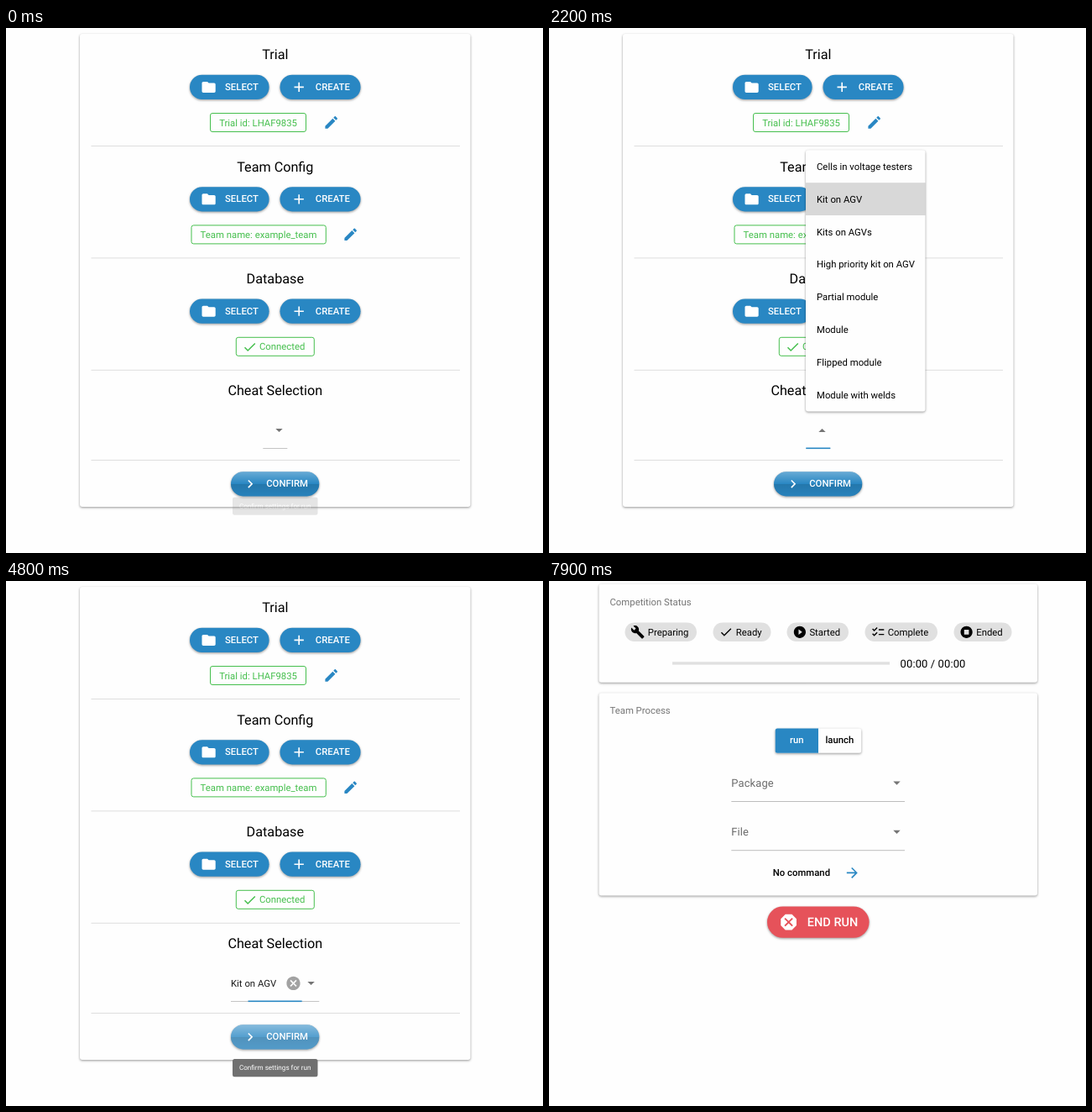
An HTML page for the animation above (8 s loop, 640x625 px).

```html
<!DOCTYPE html>
<html lang="en">
<head>
<meta charset="utf-8">
<title>Trial setup</title>
<style>
  html, body { margin: 0; width: 100%; height: 100%; overflow: hidden; background: #fefefe; }
  svg { display: block; }
  text { font: 11.34px Roboto, sans-serif; text-rendering: geometricPrecision; }
  .title { font-size: 16.2px; }
  .btn { font-weight: 500; }
  .big { font-size: 14.5px; font-weight: 500; }
  .field { font-size: 12.96px; letter-spacing: .12px; }
  .tip { font-size: 8.1px; }
  .raised { filter: drop-shadow(0 1px 1.6px rgba(0,0,0,.22)) drop-shadow(0 1px .8px rgba(0,0,0,.2)); }
  .pivot { transform-box: fill-box; transform-origin: center; }
</style>
</head>
<body>
<svg id="stage" width="640" height="625" viewBox="0 0 640 625">
  <defs>
    <linearGradient id="gloss" x1="0" y1="0" x2="0" y2="1">
      <stop offset="0" stop-color="#fff" stop-opacity=".3"/>
      <stop offset=".5" stop-color="#fff" stop-opacity="0"/>
      <stop offset=".51" stop-color="#000" stop-opacity=".12"/>
      <stop offset="1" stop-color="#000" stop-opacity=".04"/>
    </linearGradient>
  </defs>
</svg>
<script>
const LOOP = 8000;
const BLUE = '#2987c3', GREEN = '#45bf4d', RED = '#e6525a', GREY = '#757575';
const STD = 'cubic-bezier(.4,0,.2,1)', SOFT = 'cubic-bezier(.25,.8,.5,1)';
const DISC = 'M12 2C6.48 2 2 6.48 2 12s4.48 10 10 10 10-4.48 10-10S17.52 2 12 2z';
const ICONS = {
  folder: 'M10 4H4c-1.1 0-2 .9-2 2v12c0 1.1.9 2 2 2h16c1.1 0 2-.9 2-2V8c0-1.1-.9-2-2-2h-8z',
  add: 'M19 13h-6v6h-2v-6H5v-2h6V5h2v6h6z',
  edit: 'M3 17.25V21h3.75L17.81 9.94l-3.75-3.75zM20.71 7.04c.39-.39.39-1.02 0-1.41l-2.34-2.34c-.39-.39-1.02-.39-1.41 0l-1.83 1.83 3.75 3.75z',
  check: 'M9 16.17L4.83 12l-1.42 1.41L9 19 21 7l-1.41-1.41z',
  chevron: 'M10 6L8.59 7.41 13.17 12l-4.58 4.59L10 18l6-6z',
  clear: DISC + 'm5 13.59L15.59 17 12 13.41 8.41 17 7 15.59 10.59 12 7 8.41 8.41 7 12 10.59 15.59 7 17 8.41 13.41 12z',
  build: 'M22.7 19l-9.1-9.1c.9-2.3.4-5-1.5-6.9-2-2-5-2.4-7.4-1.3L9 6 6 9 1.6 4.7C.4 7.1.9 10.1 2.9 12.1c1.9 1.9 4.6 2.4 6.9 1.5l9.1 9.1c.4.4 1 .4 1.4 0l2.3-2.3c.5-.4.5-1.1.1-1.4z',
  play: DISC + 'm-2 14.5v-9l6 4.5z',
  stop: DISC + 'm4 14H8V8h8z',
  list: 'M22 7h-9v2h9zm0 8h-9v2h9zM5.54 11L2 7.46l1.41-1.41 2.12 2.12 4.24-4.24 1.41 1.41zm0 8L2 15.46l1.41-1.41 2.12 2.12 4.24-4.24 1.41 1.41z',
  arrow: 'M12 4l-1.41 1.41L16.17 11H4v2h12.17l-5.58 5.59L12 20l8-8z',
  danger: 'M15.73 3H8.27L3 8.27v7.46L8.27 21h7.46L21 15.73V8.27zM17 15.74L15.74 17 12 13.26 8.26 17 7 15.74 10.74 12 7 8.26 8.26 7 12 10.74 15.74 7 17 8.26 13.26 12z'
};

function node(parent, tag, attrs = {}) {
  const el = document.createElementNS('http://www.w3.org/2000/svg', tag);
  for (const k in attrs) el.setAttribute(k, attrs[k]);
  parent.append(el);
  return el;
}
const group = parent => node(parent, 'g');
const rect = (p, x, y, x2, y2, fill, more) =>
  node(p, 'rect', { x, y, width: x2 - x, height: y2 - y, fill, ...more });
function label(p, x, y, str, cls = '', fill = '#000', anchor = 'start') {
  node(p, 'text', { x, y, class: cls, fill, 'text-anchor': anchor }).textContent = str;
}
const icon = (p, name, cx, cy, fill, k = .81) =>
  node(p, 'path', { d: ICONS[name], fill, 'fill-rule': 'evenodd',
    transform: `translate(${cx - 12 * k} ${cy - 12 * k}) scale(${k})` });
const card = (p, x, y, x2, y2) => rect(p, x, y, x2, y2, '#fefefe', { rx: 3, class: 'raised' });
const caret = (p, x, y) =>
  node(p, 'path', { d: `M${x - 4.2} ${y - 2}h8.4l-4.2 4.2z`, fill: GREY, class: 'pivot' });

function pill(p, x, x2, y, h, fill, name, iconX, textX, str, cls = 'btn', k = .81) {
  rect(p, x, y, x2, y + h, fill, { rx: h / 2, class: 'raised' });
  const top = group(p), mid = y + h / 2;
  icon(p, name, iconX, mid, '#fff', k);
  label(p, textX, mid + (cls === 'big' ? 5 : 3.6), str, cls, '#fff');
  return top;
}

// steps: [ms, value, easing to the next step]; equal times make a hard change
function play(el, prop, steps) {
  const last = steps[steps.length - 1];
  const all = [[0, steps[0][1]], ...steps, [LOOP, last[1]]];
  el.animate(all.map(([ms, v, easing = 'linear']) => ({ offset: ms / LOOP, [prop]: v, easing })),
    { duration: LOOP, iterations: Infinity });
}
const show = (el, from, to = LOOP) => play(el, 'opacity',
  [[from, from ? 0 : 1], [from, 1], [to, 1], [to, to < LOOP ? 0 : 1]]);

const OPEN = 50, CLOSE = 3030, PICK = 3000, BLUR = 4690, SWAP = 4900, RUN = 7700;
const stage = document.getElementById('stage');

// Setup page
const setup = group(stage);
card(setup, 88, 7, 553.5, 570);
['Trial', 'Team Config', 'Database', 'Cheat Selection'].forEach((name, i) => {
  const y = i * 133.4;
  label(setup, 320.8, y + 37.2, name, 'title', '#000', 'middle');
  if (i > 2) return;
  pill(setup, 219, 313.6, y + 55.8, 29.2, BLUE, 'folder', 241.6, 261, 'SELECT');
  pill(setup, 326.5, 422.6, y + 55.8, 29.2, BLUE, 'add', 349.2, 368.8, 'CREATE');
  rect(setup, 101.5, y + 140, 541, y + 141, '#dedede');
});
rect(setup, 101.5, 514, 541, 515, '#dedede');

function tag(x, x2, y, textX, str) {
  rect(setup, x, y, x2, y + 22, 'none', { rx: 2.5, stroke: GREEN });
  label(setup, textX, y + 15, str, '', GREEN);
}
tag(243.5, 357.5, 101.5, 254.2, 'Trial id: LHAF9835');
tag(221, 381.3, 234.9, 231.6, 'Team name: example_team');
tag(274.3, 367.3, 368.3, 302, 'Connected');
icon(setup, 'edit', 387.7, 112.4, BLUE);
icon(setup, 'edit', 410.7, 245.8, BLUE);
icon(setup, 'check', 290.5, 379.8, GREEN, .76);

function select(x, x2, caretX) {
  const g = group(setup);
  rect(g, x, 500, x2, 501, '#c4c4c4');
  const line = rect(g, x, 499.5, x2, 501.1, BLUE, { class: 'pivot' });
  const arrow = caret(g, caretX, 478.9);
  play(line, 'transform', [[OPEN, 'scaleX(0)', STD], [OPEN + 360, 'scaleX(1)'],
    [BLUR, 'scaleX(1)', STD], [BLUR + 360, 'scaleX(0)']]);
  play(arrow, 'transform', [[OPEN, 'rotate(0deg)', STD], [OPEN + 360, 'rotate(180deg)'],
    [CLOSE, 'rotate(180deg)', STD], [CLOSE + 360, 'rotate(0deg)']]);
  return g;
}
show(select(306.3, 335.3, 325.5), 0, PICK);
const filled = select(268, 373.3, 363.6);
label(filled, 268, 482.6, 'Kit on AGV', '', '#1c1c1c');
icon(filled, 'clear', 342.5, 478.9, '#a2a2a2');
show(filled, PICK);

const confirmTop = pill(setup, 268, 373.3, 528.2, 29.2, BLUE, 'chevron', 291, 310.2, 'CONFIRM');
rect(confirmTop, 268, 528.2, 373.3, 557.4, 'url(#gloss)', { rx: 14.6 });
const press = rect(confirmTop, 268, 528.2, 373.3, 557.4, '#fff', { rx: 14.6 });
play(press, 'opacity', [[BLUR, 0], [4790, .2]]);

const tip = group(setup);
rect(tip, 270, 569, 371.5, 590.3, '#707070', { rx: 2.5 });
label(tip, 320.7, 582.3, 'Confirm settings for run', 'tip', '#fff', 'middle');
play(tip, 'opacity', [[0, .18], [70, 0], [3805, 0, SOFT], [4105, 1]]);
play(tip, 'transform', [[0, 'translateY(-10.6px)'], [70, 'translateY(-12.2px)'],
  [3805, 'translateY(-12.2px)', SOFT], [4105, 'translateY(0px)']]);

// Drop-down list
const menu = group(setup), ROW = 38.87;
card(menu, 306, 145.3, 448.5, 456.6);
const hovers = {
  7: [[1560, 0], [1600, .05], [1660, .06], [1900, 0]],
  5: [[1660, 0], [1720, .05], [1950, 0]],
  3: [[1720, 0], [1790, .05], [2000, 0]],
  1: [[1800, 0, SOFT], [2100, .15]]
};
['Cells in voltage testers', 'Kit on AGV', 'Kits on AGVs', 'High priority kit on AGV',
  'Partial module', 'Module', 'Flipped module', 'Module with welds'].forEach((name, i) => {
  const y = 145.3 + i * ROW;
  if (hovers[i]) play(rect(menu, 306, y, 448.5, y + ROW, '#000'), 'opacity', hovers[i]);
  label(menu, 319, y + 23.5, name);
});
play(menu, 'opacity', [[OPEN, 0, SOFT], [OPEN + 300, 1], [CLOSE, 1, SOFT], [CLOSE + 300, 0]]);
show(setup, 0, SWAP);

// Run page
const run = group(stage);
card(run, 59.5, 3.5, 582, 120.8);
card(run, 59.5, 133.3, 582, 374.6);
label(run, 72.5, 29, 'Competition Status', '', GREY);
label(run, 72.5, 158.4, 'Team Process', '', GREY);
[['Preparing', 90.5, 176, 'build', 105.7, 117.8],
 ['Ready', 195.5, 264.5, 'check', 211, 222.8],
 ['Started', 283.5, 357, 'play', 298.9, 310.4],
 ['Complete', 376.5, 463, 'list', 392.2, 403.7],
 ['Ended', 482.5, 551.5, 'stop', 497.6, 509.2]].forEach(([name, x, x2, pic, iconX, textX]) => {
  rect(run, x, 49.4, x2, 72, '#e0e0e0', { rx: 11.3 });
  icon(run, pic, iconX, 60.8, '#000', .71);
  label(run, textX, 64.8, name);
});
rect(run, 147, 96.3, 406, 99.6, '#e0e0e0');
label(run, 418.6, 102.6, '00:00 / 00:00', 'field');

rect(run, 269.7, 175.6, 372.2, 204.8, '#fefefe', { rx: 2.5, class: 'raised' });
node(run, 'path', { d: 'M321 175.6h-48.8q-2.5 0-2.5 2.5v24.2q0 2.5 2.5 2.5H321z', fill: BLUE });
label(run, 295.3, 193.4, 'run', 'btn', '#fff', 'middle');
label(run, 346.4, 193.4, 'launch', 'btn', '#000', 'middle');
[['Package', 240.6], ['File', 298.8]].forEach(([name, y]) => {
  label(run, 217.3, y + 4.6, name, 'field', '#6b6b6b');
  caret(run, 414.5, y);
  rect(run, 217.3, y + 21.4, 424, y + 22.4, '#bdbdbd');
});
label(run, 266.8, 351, 'No command', 'btn');
icon(run, 'arrow', 361.3, 347.4, BLUE);

const start = group(run);
const startTop = pill(start, 252, 389.6, 387.4, 37.4, '#4bbf54', 'play', 277.7, 299.8, 'START RUN', 'big', 1.04);
const glow = rect(startTop, 252, 387.4, 389.6, 424.8, '#fff', { rx: 18.7 });
play(glow, 'opacity', [[7490, 0], [7640, .18]]);
show(start, 0, RUN);
const end = group(run);
pill(end, 260, 381.6, 387.4, 37.4, RED, 'danger', 285.6, 307.8, 'END RUN', 'big', 1.04);
show(end, RUN);
show(run, SWAP);
</script>
</body>
</html>
```
